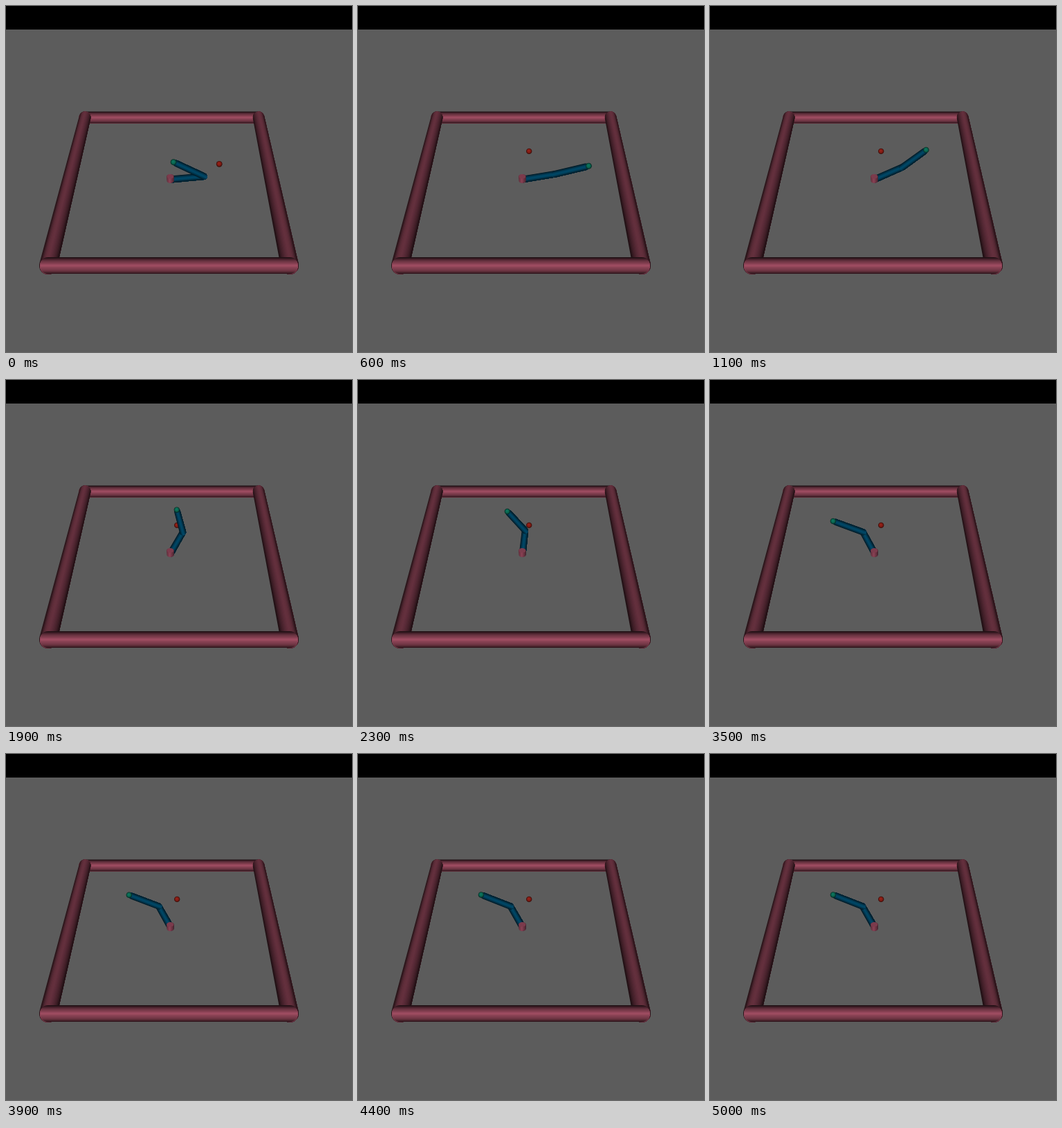
Animation, 500 px wide and 500 px high, one loop 5.1 s. Source, as an HTML page with a canvas:

```html
<!DOCTYPE html>
<html lang="en">
<head>
<meta charset="utf-8">
<title>Two-link arm</title>
<style>
  html, body { margin: 0; width: 100%; height: 100%; overflow: hidden; background: #000; }
  canvas { display: block; width: 500px; height: 500px; }
</style>
</head>
<body>
<canvas id="stage" width="500" height="500"></canvas>
<script>
const ctx = document.getElementById('stage').getContext('2d');
const LOOP = 5100, STEP = 100;

// time in steps, shoulder angle, absolute forearm angle (degrees)
const KEYS = [
  [1, 0, 0], [11, 31.8, 45.4], [19, 68.3, 100], [25, 94.5, 133.5],
  [27, 101.3, 145.4], [31, 110.2, 152.2], [35, 112, 152], [44, 113, 150.4], [50, 113, 150.4]
];
const START_POSE = [7.3, 145.9];
const PINK = [162, 78, 100], BLUE = [0, 74, 106], GREEN = [12, 124, 98], RED = [158, 34, 24];

const FACING = [.2, .5, .68, .82, 1, .86, .74, .62, .3];
const LEFT = [.25, .5, .6, .62, .56, .48, .38, .2];
const RIGHT = [...LEFT].reverse();
const LINK = [.35, .75, 1, .8, .35];

const lerp = (a, b, u) => a + (b - a) * u;
const shade = (rgb, k) => `rgb(${rgb.map(c => Math.round(c * k)).join()})`;

// Perspective of the table plane; the walls lie at X, Y = -1 and 1.
function project(X, Y) {
  const w = 1 + .1633 * Y;
  return { x: (237.8 + 146 * X + 40.8 * Y) / w, y: (250.5 - 63.25 * Y) / w, s: 1 / w };
}

// Rounded, tapered rod shaded across its width.
function tube(p, q, rp, rq, rgb, profile) {
  const a = Math.atan2(q.y - p.y, q.x - p.x);
  const dx = Math.cos(a), dy = Math.sin(a);
  const at = (o, r, side, along) => [o.x - dy * r * side + dx * r * along, o.y + dx * r * side + dy * r * along];
  ctx.save();
  ctx.beginPath();
  ctx.arc(p.x, p.y, rp, a + Math.PI / 2, a + Math.PI * 1.5);
  ctx.arc(q.x, q.y, rq, a - Math.PI / 2, a + Math.PI / 2);
  ctx.closePath();
  ctx.clip();
  const n = 20;
  for (let i = 0; i < n; i++) {
    const side = i ? 2 * i / n - 1 : -1.2;
    const f = i / (n - 1) * (profile.length - 1), j = Math.min(Math.floor(f), profile.length - 2);
    ctx.fillStyle = shade(rgb, lerp(profile[j], profile[j + 1], f - j));
    ctx.beginPath();
    ctx.moveTo(...at(p, rp, side, -1.2));
    ctx.lineTo(...at(q, rq, side, 1.2));
    ctx.lineTo(...at(q, rq, 1.2, 1.2));
    ctx.lineTo(...at(p, rp, 1.2, -1.2));
    ctx.fill();
  }
  ctx.restore();
}

function ball(x, y, r, rgb) {
  const g = ctx.createRadialGradient(x - .5, y - 1, 0, x, y, r);
  g.addColorStop(0, shade(rgb, 1));
  g.addColorStop(.6, shade(rgb, .8));
  g.addColorStop(1, shade(rgb, .3));
  ctx.fillStyle = g;
  ctx.beginPath();
  ctx.arc(x, y, r, 0, 7);
  ctx.fill();
}

function pivot() {
  const g = ctx.createLinearGradient(231.5, 0, 243, 0);
  g.addColorStop(0, shade(PINK, .55));
  g.addColorStop(.45, shade(PINK, .85));
  g.addColorStop(1, shade(PINK, .45));
  ctx.fillStyle = g;
  ctx.beginPath();
  ctx.ellipse(237.4, 246.5, 5.5, 3.6, 0, Math.PI, 0);
  ctx.ellipse(237.6, 252.5, 5.2, 3.6, 0, 0, Math.PI);
  ctx.fill();
  ctx.fillStyle = shade(PINK, .76);
  ctx.beginPath();
  ctx.ellipse(237.4, 246.6, 4.8, 3, 0, 0, 7);
  ctx.fill();
}

function slope(i, c) {
  const rate = k => (KEYS[k + 1][c] - KEYS[k][c]) / (KEYS[k + 1][0] - KEYS[k][0]);
  if (i === 0) return rate(0) * .45;
  if (i === KEYS.length - 1) return 0;
  const a = rate(i - 1), b = rate(i);
  return a * b <= 0 ? 0 : 2 * a * b / (a + b);
}

// Smooth cubic through the keys without overshoot.
function angle(t, c) {
  let i = 0;
  while (i < KEYS.length - 2 && t > KEYS[i + 1][0]) i++;
  const [A, B] = [KEYS[i], KEYS[i + 1]], h = B[0] - A[0], u = (t - A[0]) / h, v = 1 - u;
  return v * v * (1 + 2 * u) * A[c] + u * u * (3 - 2 * u) * B[c]
    + h * u * v * (v * slope(i, c) - u * slope(i + 1, c));
}

function drawTable() {
  ctx.fillStyle = '#000';
  ctx.fillRect(0, 0, 500, 34);
  ctx.fillStyle = '#5c5c5c';
  ctx.fillRect(0, 34, 500, 466);
  const bl = project(-1, 1), br = project(1, 1), fl = project(-1, -1), fr = project(1, -1);
  tube(bl, br, 8.4, 8.4, PINK, FACING);
  tube(fl, bl, 13, 8.4, PINK, LEFT);
  tube(fr, br, 13, 8.4, PINK, RIGHT);
  tube(fl, fr, 11.9, 11.9, PINK, FACING);
}

function drawArm([shoulder, fore]) {
  const a = shoulder * Math.PI / 180, b = fore * Math.PI / 180;
  const ex = Math.cos(a) / 3, ey = Math.sin(a) / 3;
  const reach = r => project(ex + Math.cos(b) * r, ey + Math.sin(b) * r);
  const base = project(0, 0), elbow = project(ex, ey), wrist = reach(1 / 3), tip = reach(.11 / .3);
  const link = (p, q) => tube(p, q, 4.9 * p.s, 4.9 * q.s, BLUE, LINK);
  link(base, elbow);
  link(elbow, wrist);
  ball(tip.x, tip.y, 4.6 * tip.s, GREEN);
  pivot();
}

function draw(step) {
  drawTable();
  if (step === 0) ball(308.2, 228.3, 4.4, RED);
  else ball(247.2, 209.9, 4.2, RED);
  drawArm(step === 0 ? START_POSE : [angle(step, 1), angle(step, 2)]);
}

let shown = -1;
const begin = performance.now();
function tick() {
  const step = Math.floor((performance.now() - begin) % LOOP / STEP);
  if (step !== shown) draw(shown = step);
  requestAnimationFrame(tick);
}
tick();
</script>
</body>
</html>
```
